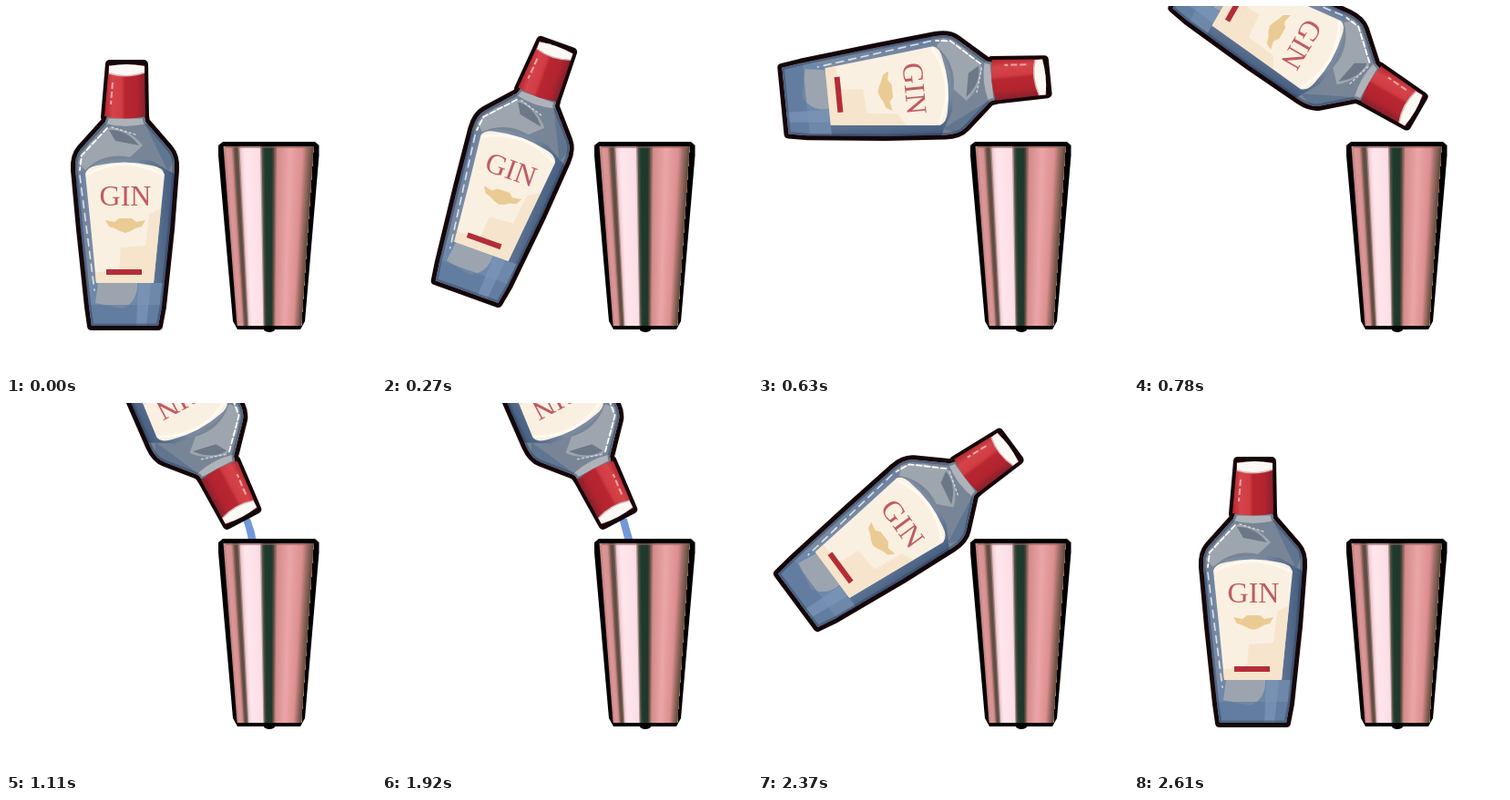
These frames come from a looping animation (406x405 px, 2880 ms). An HTML page:

```html
<!DOCTYPE html>
<html lang="en">
<head>
<meta charset="utf-8">
<title>Pouring gin</title>
<style>
  html, body { margin: 0; width: 100%; height: 100%; overflow: hidden; background: #fff; }
  svg { display: block; width: 100vw; height: 100vh; }
</style>
</head>
<body>
<svg viewBox="0 0 406 405">
  <defs>
    <linearGradient id="glass">
      <stop offset="0" stop-color="#657b9b"/>
      <stop offset=".2" stop-color="#7f8fa6"/>
      <stop offset=".6" stop-color="#77889f"/>
      <stop offset=".85" stop-color="#566d8d"/>
      <stop offset="1" stop-color="#425a7c"/>
    </linearGradient>
    <linearGradient id="foil">
      <stop offset="0" stop-color="#b32630"/>
      <stop offset=".2" stop-color="#d5444a"/>
      <stop offset=".42" stop-color="#d03c43"/>
      <stop offset=".5" stop-color="#b82630"/>
      <stop offset=".78" stop-color="#b3242f"/>
      <stop offset="1" stop-color="#85202b"/>
    </linearGradient>
    <clipPath id="inside"><use href="#body"/></clipPath>
  </defs>

  <path id="stream" fill="#7398d8"/>
  <g id="cup"></g>

  <g id="bottle">
    <g stroke="#150609" stroke-width="10" stroke-linejoin="round">
      <path id="body" d="M111 121 L109 127 L82 157 Q75 165 76 180 L82 245 L91 330 L94 351 H167 L171 330 L180 245 L185 180 Q186 165 179 157 L153 127 L152 121Z"/>
      <path d="M114 64 H151 L152 122 H109Z"/>
    </g>
    <use href="#body" fill="url(#glass)"/>
    <g clip-path="url(#inside)">
      <path d="M109 126 H154 L186 162 V185 L160 170 Q130 164 101 172 L76 186 V160Z" fill="#788596"/>
      <path d="M92 151 L114 133 Q137 136 150 153 L136 166 Q108 160 87 180 L79 172Z" fill="#9da5ae"/>
      <path d="M113 136 Q132 135 146 153 L120 148Z" fill="#6c7888"/>
      <path d="M152 128 L186 164 L178 182 L163 151Z" fill="#60758f"/>
      <path d="M109 122 H154 V129 Q130 135 109 129Z" fill="#aeb3ba"/>
      <path d="M94 304 H173 L168 354 H91Z" fill="#6e88aa"/>
      <path d="M101 304 H144 Q145 324 128 332 L98 326Z" fill="#9ca5af"/>
      <path d="M91 328 H173 V354 H91Z" fill="#5f799b" opacity=".65"/>
      <path d="M145 304 H159 L154 352 H143Z" fill="#7f9abb" opacity=".6"/>
      <use href="#body" fill="none" stroke="#33435f" stroke-width="5" opacity=".5"/>
    </g>

    <path d="M87 184 Q89 177 100 175 Q130 168 160 175 Q172 177 174 185 L168 244 L162 304 L99 304 L93 242Z" fill="#faf0e2"/>
    <path d="M157 229 L170 222 L162 304 H99 L98 292 L124 291 L126 265 L153 263Z" fill="#f5e2c4" opacity=".75"/>
    <path d="M89 185 Q130 162 172 185" fill="none" stroke="#fff9ef" stroke-width="3"/>
    <text x="131" y="219" font-family="'Liberation Serif', serif" font-size="32" text-anchor="middle" fill="#c05a62">GIN</text>
    <path d="M109 235 L119 237 L124 233 H138 L143 237 L153 235 L149 242 L142 244 L137 247 L131 249 L125 247 L119 244 L113 242Z" fill="#ebcb94"/>
    <path d="M110 289 H149 V295 H110Z" fill="#b42c38"/>

    <g fill="none" stroke="#fff" stroke-linecap="round">
      <path d="M111 134 L83 164 L81 180" stroke-width="1.8" stroke-dasharray="6 3"/>
      <path d="M81 186 L97 312" stroke-width="1.6" stroke-dasharray="8 6" opacity=".75"/>
      <path d="M116 133 L142 141" stroke-width="1.5" stroke-dasharray="2 3" opacity=".6"/>
    </g>

    <path d="M113 65 H152 L153 121 Q131 126 108 121Z" fill="url(#foil)"/>
    <path d="M113 66 Q132 62 152 66 V73 Q132 80 113 74Z" fill="#fcf9f5"/>
    <path d="M113 74 Q132 80 152 73" fill="none" stroke="#d8b7b5" stroke-width="1.5"/>
    <path d="M117 84 L115 108" stroke="#f3a7a5" stroke-width="2" stroke-dasharray="7 3"/>
  </g>
</svg>
<script>
const LOOP = 2880, TICK = 30;
const PIVOT = [130, 217.5], SHIFT = [59, -229], TILT = 152;
const $ = id => document.getElementById(id);
const clamp = v => Math.min(1, Math.max(0, v));
const mix = (a, b, k) => a + (b - a) * k;

// Cubic bezier (.42, 0, 1, 1), solved by bisection.
function easeIn(x) {
  if (x <= 0 || x >= 1) return clamp(x);
  let lo = 0, hi = 1;
  for (let i = 0; i < 24; i++) {
    const s = (lo + hi) / 2;
    const at = 1.26 * s * (1 - s) ** 2 + 3 * s * s * (1 - s) + s ** 3;
    if (at < x) lo = s; else hi = s;
  }
  return lo * lo * (3 - 2 * lo);
}

function buildCup() {
  const shine = [
    [0, '#bd7d7c'], [.04, '#dd9798'], [.09, '#d48f8f'], [.12, '#6a5145'],
    [.155, '#58493c'], [.19, '#f3c9d0'], [.23, '#fee6ed'], [.4, '#fddde5'],
    [.43, '#5a5548'], [.46, '#1d3b2d'], [.54, '#22392c'], [.57, '#75584d'],
    [.6, '#d48b8a'], [.74, '#eba6a7'], [.88, '#dc8e8f'], [.94, '#97695f'],
    [.98, '#6f5547'], [1, '#604a3e']
  ];
  const channels = hex => [1, 3, 5].map(i => parseInt(hex.slice(i, i + 2), 16));
  const tint = k => {
    const i = shine.findIndex(stop => stop[0] >= k);
    const [[from, a], [to, b]] = [shine[i - 1], shine[i]];
    const end = channels(b);
    return `rgb(${channels(a).map((c, n) => Math.round(mix(c, end[n], (k - from) / (to - from))))})`;
  };
  // Each strip reaches the right edge, so the next one covers it without a seam.
  const count = 66;
  let strips = '';
  for (let i = 0; i < count; i++) {
    const k = i / count;
    strips += `<path d="M${mix(238.5, 337.5, k)} 154 H337.5 L324 351 H${mix(253.5, 324, k)}Z" fill="${tint((i + .5) / count)}"/>`;
  }
  $('cup').innerHTML =
    '<path d="M238 149 H339 L343.5 153 V164 L328 346 L323 355 H254 L249 346 L233 164 V153Z"/>' +
    '<ellipse cx="289" cy="355" rx="6" ry="3"/>' + strips +
    '<path d="M241 155 H335" stroke="#8d5b58" stroke-width="2" opacity=".6"/>';
}

function draw(now) {
  const t = Math.floor(now % LOOP / TICK) * TICK;
  const k = easeIn(t < 1500 ? clamp(t / 900) : clamp((2610 - t) / 450));
  $('bottle').setAttribute('transform',
    `translate(${SHIFT[0] * k} ${SHIFT[1] * k}) rotate(${TILT * k} ${PIVOT})`);

  const sway = t < 1290 ? 0 : 1.5 * Math.sin((t - 1290) / 300 * Math.PI * 2);
  $('stream').setAttribute('d',
    `M${259.5 + sway} 127 H${268 + sway} Q${273 - sway} 140 ${275 + sway} 152 H${266 + sway} Q${265 - sway} 142 ${259.5 + sway} 127Z`);
  $('stream').setAttribute('visibility', t >= 1110 && t < 2160 ? 'visible' : 'hidden');
}

buildCup();
const start = performance.now();
function frame() {
  draw(performance.now() - start);
  requestAnimationFrame(frame);
}
frame();
</script>
</body>
</html>
```
